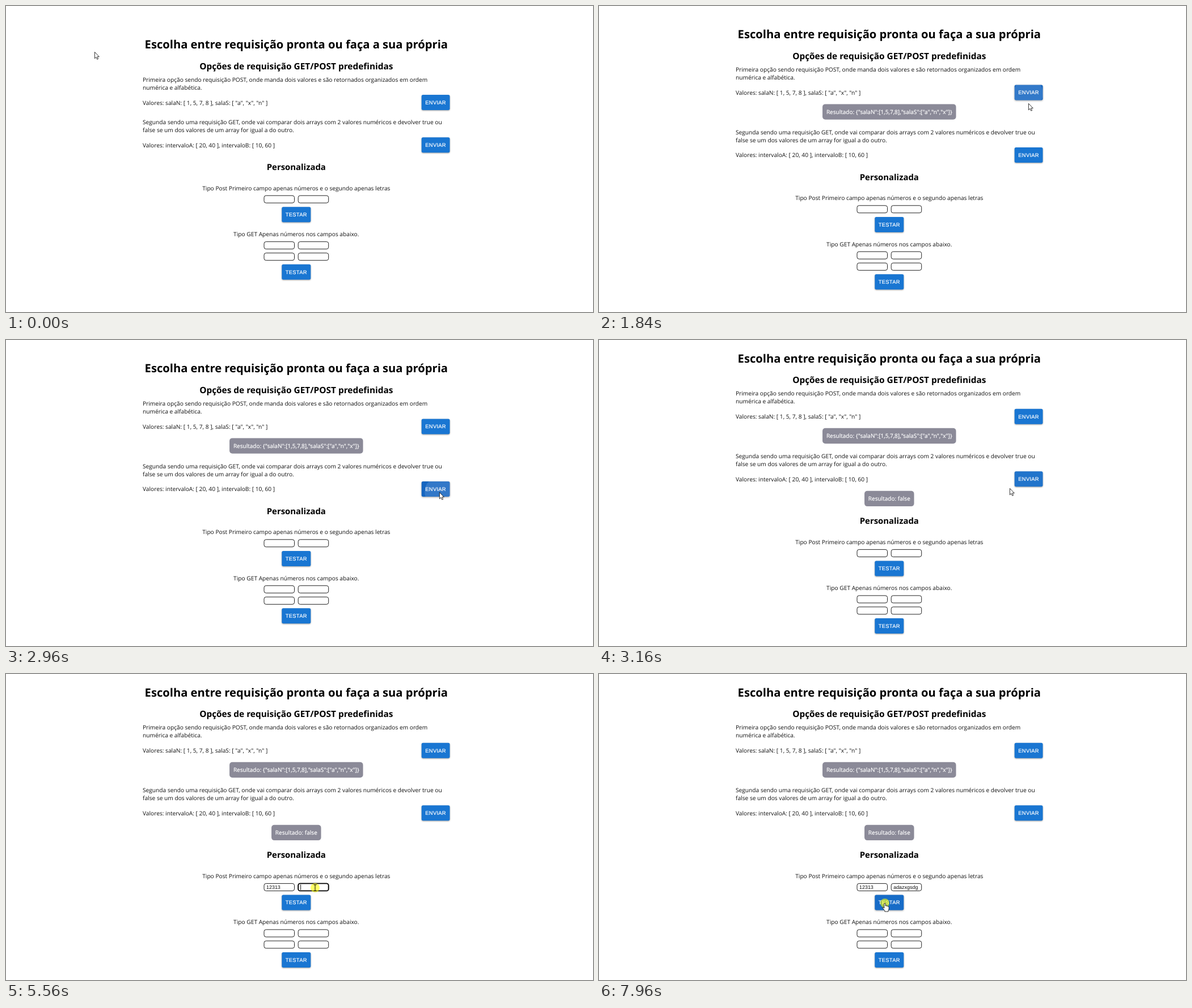
Write an HTML page that moves like this. It is 1035x541 px and loops after 8 s.

```html
<!DOCTYPE html>
<html lang="pt-BR">
<head>
<meta charset="utf-8">
<title>Requisições</title>
<style>
  html, body { margin: 0; width: 100%; height: 100%; overflow: hidden; background: #fff; }
  svg { display: block; }
  text { font: 10.18px "Open Sans", "Noto Sans", sans-serif; fill: #111; text-rendering: geometricPrecision; white-space: pre; }
  .mid { text-anchor: middle; }
  .h1 { font-size: 20.17px; font-weight: 700; fill: #000; }
  .h2 { font-size: 15.4px; font-weight: 700; fill: #000; }
  .h3 { font-size: 14.9px; font-weight: 700; fill: #000; }
  .label { font: 9.38px "Liberation Sans", Arial, sans-serif; letter-spacing: .27px; }
  .value { font: 8.93px "Liberation Sans", Arial, sans-serif; }
  .result rect { fill: #8b8a98; }
  .result text { font-size: 10.05px; }
  .label, .result text { fill: #fff; stroke: #fff; stroke-width: .2px; }
</style>
</head>
<body>
<svg id="stage" width="1035" height="541" viewBox="0 0 1035 541">
  <g id="top"></g>
  <g id="middle"></g>
  <g id="low"></g>
  <circle id="glow" r="8" fill="#ff0" fill-opacity=".6"/>
  <g id="cursor" stroke="#000" stroke-width=".8" stroke-linejoin="round" fill="#fff">
    <path id="arrow" d="M.4 .4V11.8L3 9.4 4.7 13.3 6.6 12.5 4.9 8.7H8.3z"/>
    <path id="beam" fill="none" stroke-width="1" d="M-2.5-5.5H-.8L0-5 .8-5.5H2.5M0-5V5M-2.5 5.5H-.8L0 5 .8 5.5H2.5"/>
    <path id="hand" d="M-1.2 1Q0-.8 1.2 1V5L2 4.6Q3 4.4 3.3 5.4 4.6 4.8 5.2 5.9 7 5.4 7.2 7V10Q7 12 6 13.2V15H-.2V13.4L-4 8.8Q-4.6 7.4-3 7.4L-1.2 9z"/>
  </g>
</svg>
<script>
const LOOP = 8000, CENTER = 511.8, STEP = 17.6;
const POST_OPENS = 1840, GET_OPENS = 3040;
const $ = id => document.getElementById(id);
const clamp = v => Math.max(0, Math.min(1, v));
const show = (node, on) => node.setAttribute('visibility', on ? 'visible' : 'hidden');

function add(parent, tag, attrs, content) {
  const node = document.createElementNS('http://www.w3.org/2000/svg', tag);
  for (const key in attrs) node.setAttribute(key, attrs[key]);
  if (content) node.textContent = content;
  return parent.appendChild(node);
}

const top_ = $('top'), middle = $('middle'), low = $('low');
const line = (group, y, content) => add(group, 'text', { x: 241, y }, content);
const centered = (group, y, content, cls = '') =>
  add(group, 'text', { x: CENTER, y, class: 'mid ' + cls }, content);

function result(group, y, width, content) {
  const box = add(group, 'g', { class: 'result' });
  add(box, 'rect', { x: CENTER - width / 2, y, width, height: 27.4, rx: 5 });
  centered(box, y + 17.6, content);
  return box;
}

function button(group, x, y, width, content, clickTime) {
  const height = 27;
  const face = add(group, 'rect', { x, y, width, height, rx: 2.7 });
  const clip = add(group, 'svg', { x, y, width, height });
  const ripple = add(clip, 'circle', { fill: '#fff' });
  add(group, 'text', { x: x + width / 2, y: y + 16.9, class: 'mid label' }, content);
  return { group, x, y, width, height, face, ripple, clickTime };
}

function field(x, y) {
  const frame = add(low, 'rect', { x, y, width: 53.5, height: 13, rx: 3.5, fill: '#fff', stroke: '#222' });
  const value = add(low, 'text', { x: x + 4, y: y + 9.5, class: 'value' });
  const caret = add(low, 'rect', { y: y + 1.7, width: .9, height: 9.8 });
  return { x, frame, value, caret };
}

centered(top_, 75, 'Escolha entre requisição pronta ou faça a sua própria', 'h1');
centered(top_, 111.5, 'Opções de requisição GET/POST predefinidas', 'h2');
line(top_, 133.5, 'Primeira opção sendo requisição POST, onde manda dois valores e são retornados organizados em ordem');
line(top_, 147.5, 'numérica e alfabética.');
line(top_, 174.5, 'Valores: salaN: [ 1, 5, 7, 8 ], salaS: [ "a", "x", "n" ]');
const postResult = result(top_, 191, 235.5, 'Resultado: {"salaN":[1,5,7,8],"salaS":["a","n","x"]}');

line(middle, 209, 'Segunda sendo uma requisição GET, onde vai comparar dois arrays com 2 valores numéricos e devolver true ou');
line(middle, 223, 'false se um dos valores de um array for igual a do outro.');
line(middle, 249.5, 'Valores: intervaloA: [ 20, 40 ], intervaloB: [ 10, 60 ]');
const getResult = result(middle, 266.7, 87.5, 'Resultado: false');

centered(low, 290, 'Personalizada', 'h3');
centered(low, 325.5, 'Tipo Post Primeiro campo apenas números e o segundo apenas letras');
centered(low, 407, 'Tipo GET Apenas números nos campos abaixo.');
const numbers = field(455, 335.2), letters = field(515.2, 335.2);
for (const y of [416.7, 436.7]) for (const x of [455, 515.2]) show(field(x, y).caret, false);
const spinner = add(low, 'g', {});
add(spinner, 'rect', { x: 495, y: 336.4, width: 11.5, height: 10.6, fill: '#eee' });
add(spinner, 'path', { d: 'M498.7 340.3l2.1-2 2.1 2M498.7 343.3l2.1 2 2.1-2', fill: 'none', stroke: '#555', 'stroke-width': .9 });

const buttons = [
  button(top_, 732.7, 157, 49.8, 'ENVIAR', 1600),
  button(middle, 732.7, 232.3, 49.8, 'ENVIAR', 2720),
  button(low, 486.3, 355.3, 51, 'TESTAR', 7920),
  button(low, 486.3, 456.7, 51, 'TESTAR', Infinity)
];

// Pointer path: time, x, y, shape shown from then on
const path = [
  [0, 156, 81, 'arrow'], [160, 156, 81, 'arrow'], [520, 803, 284, 'arrow'], [700, 803, 284, 'arrow'],
  [800, 792, 225, 'arrow'], [920, 752, 196, 'beam'], [1080, 750, 184, 'hand'], [1240, 757, 172, 'hand'],
  [1840, 757, 172, 'arrow'], [2000, 700, 202, 'arrow'], [2160, 688, 222, 'beam'], [2440, 700, 250, 'arrow'],
  [2640, 764, 268, 'hand'], [2840, 764, 269, 'arrow'], [3040, 764, 269, 'arrow'], [3160, 724, 262, 'arrow'],
  [3320, 722, 190, 'arrow'], [3600, 570, 290, 'arrow'], [3760, 508, 400, 'hand'], [3880, 510, 500, 'hand'],
  [4040, 494.5, 377.5, 'beam'], [4160, 494.5, 377.5, 'beam'], [4280, 490, 363, 'beam'], [4440, 486, 371, 'beam'],
  [4720, 486, 371, ''], [5080, 540, 370, 'beam'], [5240, 568, 384, 'arrow'], [5400, 568, 384, 'arrow'],
  [5520, 545, 378, 'beam'], [5680, 545, 378, 'beam'], [5900, 540, 387, 'arrow'], [6320, 540, 387, ''],
  [7440, 540, 387, 'arrow'], [7640, 512, 500, 'hand'], [7840, 504, 405, 'hand'], [LOOP, 504, 405, 'hand']
];
const clicks = [1600, 2720, 4040, 5520, 7920];
const numberKeys = [4720, 4800, 4880, 4960, 5040];
const letterKeys = [6080, 6240, 6320, 6480, 6560, 7160, 7240, 7320, 7400];

function pointer(t) {
  let i = 0;
  while (i < path.length - 2 && path[i + 1][0] <= t) i++;
  const [t0, x0, y0, shape] = path[i], [t1, x1, y1] = path[i + 1];
  const p = clamp((t - t0) / (t1 - t0));
  return { x: x0 + (x1 - x0) * p, y: y0 + (y1 - y0) * p, shape };
}

// Vertical shift of each block as results open and the page recentres
function shifts(t) {
  const opened = (t >= POST_OPENS) + (t >= GET_OPENS);
  return { opened, top: -STEP * opened, middle: opened === 1 ? STEP : 0, low: STEP * opened };
}

function isOver(b, t) {
  const { x, y } = pointer(t), dy = y - b.y - shifts(t)[b.group.id];
  return x >= b.x && x <= b.x + b.width && dy >= 0 && dy <= b.height;
}

// Share of the last 250 ms spent under the pointer gives the colour fade
function hoverAmount(b, t) {
  let sum = 0;
  for (let i = 0; i < 25; i++) sum += isOver(b, Math.max(0, t - i * 10));
  return sum / 25;
}

function drawButton(b, t) {
  const h = hoverAmount(b, t), mix = (from, to) => Math.round(from + (to - from) * h);
  b.face.setAttribute('fill', `rgb(${mix(25, 21)},${mix(118, 101)},${mix(210, 192)})`);
  b.face.style.filter = `drop-shadow(0 ${1 + h * .7}px ${.8 + h}px rgba(0,0,0,.38))`;
  const age = t - b.clickTime, left = 1 - clamp(age / 550);
  show(b.ripple, age >= 0 && age < 550);
  if (age < 0) return;
  const at = pointer(b.clickTime);
  b.ripple.setAttribute('cx', at.x - b.x);
  b.ripple.setAttribute('cy', at.y - b.y - shifts(b.clickTime)[b.group.id]);
  b.ripple.setAttribute('r', 38 * (1 - left * left));
  b.ripple.setAttribute('opacity', .14 * (1 - clamp((age - 200) / 350)));
}

function drawField(f, text, keys, t, focused, caretOn = true) {
  f.value.textContent = text.slice(0, keys.filter(k => k <= t).length);
  f.frame.setAttribute('stroke', focused ? '#000' : '#222');
  f.frame.setAttribute('stroke-width', focused ? 1.9 : 1);
  f.caret.setAttribute('x', f.x + 4 + f.value.getComputedTextLength());
  show(f.caret, focused && caretOn);
}

function draw(t) {
  const shift = shifts(t);
  for (const group of [top_, middle, low])
    group.setAttribute('transform', `translate(0 ${shift[group.id]})`);
  show(postResult, shift.opened > 0);
  show(getResult, shift.opened > 1);
  buttons.forEach(b => drawButton(b, t));

  const inNumbers = t >= 4040 && t < 5520;
  drawField(numbers, '12313', numberKeys, t, inNumbers, t < 4520 || t >= 4720);
  drawField(letters, 'adazxgsdg', letterKeys, t, t >= 5520 && t < 7920);
  show(spinner, inNumbers);

  const { x, y, shape } = pointer(t), place = `translate(${x} ${y})`;
  $('cursor').setAttribute('transform', place);
  $('glow').setAttribute('transform', place);
  show($('glow'), clicks.some(c => t >= c && t < c + 80));
  for (const id of ['arrow', 'beam', 'hand']) show($(id), id === shape);
}

const start = performance.now();
function tick() {
  const t = (performance.now() - start) % LOOP;
  draw(t - t % 40);
  requestAnimationFrame(tick);
}
tick();
</script>
</body>
</html>
```
